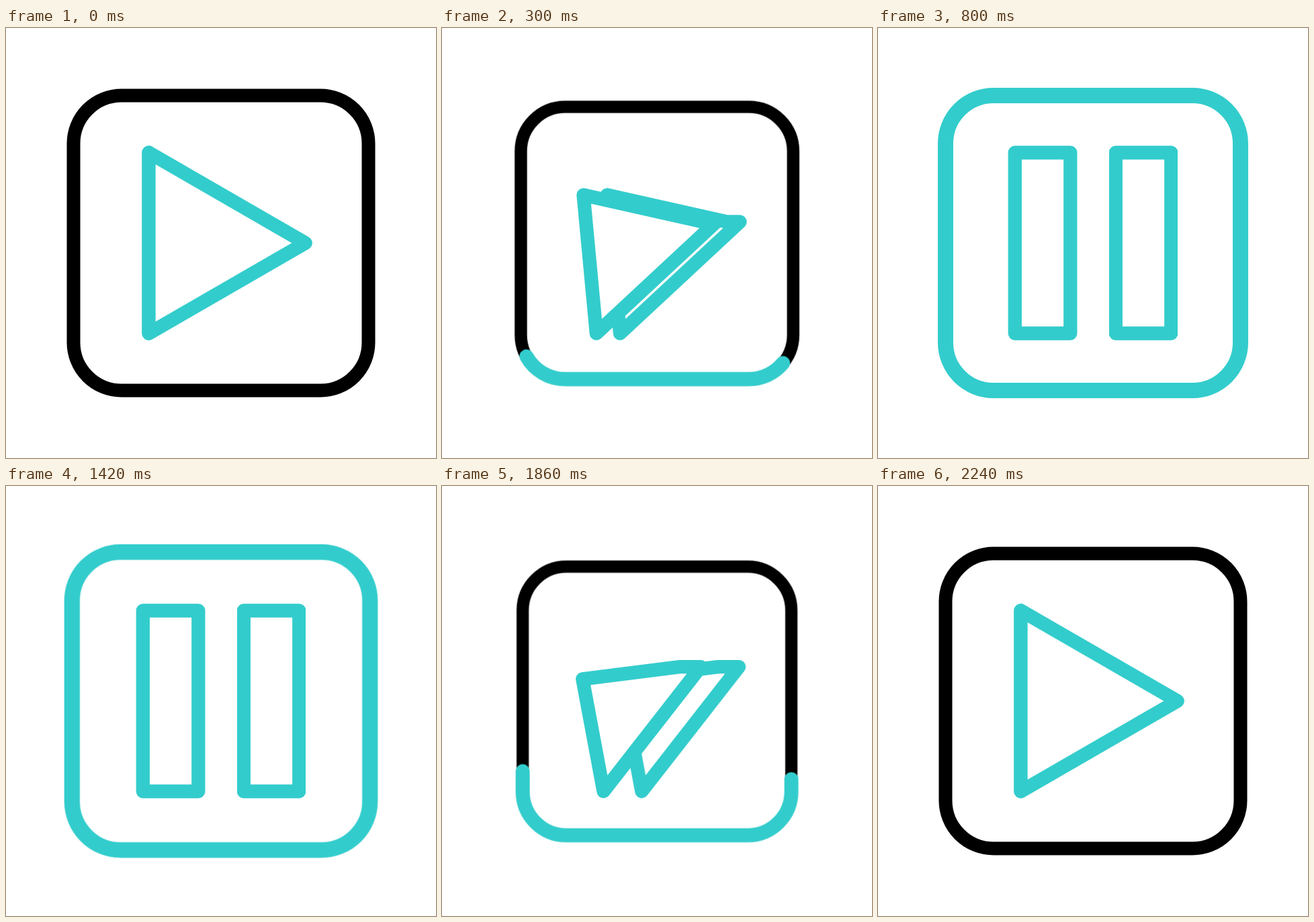
An HTML page for the animation above (3600 ms loop, 640 px wide and 640 px high).

```html
<!DOCTYPE html>
<html lang="en">
<head>
<meta charset="utf-8">
<title>Play and pause button</title>
<style>
  :root {
    --cyan: #33cccc;
    --loop: 3600ms;
    --smooth: cubic-bezier(.333, 0, .667, 1);
  }
  html, body { margin: 0; width: 100%; height: 100%; overflow: hidden; background: #fff; }
  svg { display: block; width: 100%; height: 100%; }
  path { fill: none; stroke-linecap: round; stroke-linejoin: round; }

  .frame { transform-origin: 320px 320px; animation: bounce var(--loop) infinite; }
  .base { stroke: #000; stroke-width: 20; }
  .trace { stroke: var(--cyan); stroke-width: 23; animation: trace var(--loop) var(--smooth) infinite; }
  .bar { fill: #fff; stroke: var(--cyan); stroke-width: 20.3; animation: morph var(--loop) var(--smooth) infinite; }
  .slide { animation: slide var(--loop) var(--smooth) infinite; }
  .trim { animation: trim var(--loop) step-end infinite; }

  /* Swell smoothly, then follow a parabola down and up again */
  @keyframes bounce {
    0%      { transform: scale(1); }
    .167%   { transform: scale(1);    animation-timing-function: cubic-bezier(.333, 0, .667, 1); }
    2.139%  { transform: scale(1.1);  animation-timing-function: cubic-bezier(.333, .667, .667, 1); }
    11.111% { transform: scale(.905); animation-timing-function: cubic-bezier(.333, 0, .667, .333); }
    20.083% { transform: scale(1.1);  animation-timing-function: cubic-bezier(.333, 0, .667, 1); }
    22.222% { transform: scale(1); }
    39.056% { transform: scale(1);    animation-timing-function: cubic-bezier(.333, 0, .667, 1); }
    41.167% { transform: scale(1.1);  animation-timing-function: cubic-bezier(.333, .667, .667, 1); }
    50.139% { transform: scale(.905); animation-timing-function: cubic-bezier(.333, 0, .667, .333); }
    59.111% { transform: scale(1.1);  animation-timing-function: cubic-bezier(.333, 0, .667, 1); }
    61.944%, 100% { transform: scale(1); }
  }

  /* The dash grows both ways from the point opposite the path start */
  @keyframes trace {
    0%, 2.694%, 58.389%, 100% { stroke-dasharray: 0 100; stroke-dashoffset: -50; visibility: hidden; }
    19.444%, 41.639%          { stroke-dasharray: 100 0; stroke-dashoffset: 0; visibility: visible; }
  }

  /* The tip splits into the bar's top edge, the upper corner drops to its base */
  @keyframes morph {
    0%, 3.5%, 58.167%, 100% { d: path("M212.5 185.5L445.5 320L445.5 320L212.5 454.5Z"); }
    18.972%, 42.694%        { d: path("M203.8 454.5L203.8 185.5L286.3 185.5L286.3 454.5Z"); }
  }
  @keyframes slide {
    0%, 3.5%, 58.167%, 100% { transform: translateX(0); }
    18.972%, 42.694%        { transform: translateX(150px); }
  }
  @keyframes trim {
    0%, 42.694%, 100% { clip-path: none; }
    18.972%           { clip-path: url(#edge); }
  }
</style>
</head>
<body>
<svg viewBox="0 0 640 640">
  <defs>
    <clipPath id="edge"><rect x="344.5" y="0" width="101" height="640"/></clipPath>
    <path id="box" pathLength="100" d="M326.5 100.5H468A71.5 71.5 0 0 1 539.5 172V468A71.5 71.5 0 0 1 468 539.5H172A71.5 71.5 0 0 1 100.5 468V172A71.5 71.5 0 0 1 172 100.5Z"/>
  </defs>
  <g class="frame">
    <use class="base" href="#box"/>
    <use class="trace" href="#box"/>
  </g>
  <g class="trim">
    <g class="slide">
      <path class="bar" d="M212.5 185.5L445.5 320L445.5 320L212.5 454.5Z"/>
    </g>
  </g>
  <path class="bar" d="M212.5 185.5L445.5 320L445.5 320L212.5 454.5Z"/>
</svg>
</body>
</html>
```
